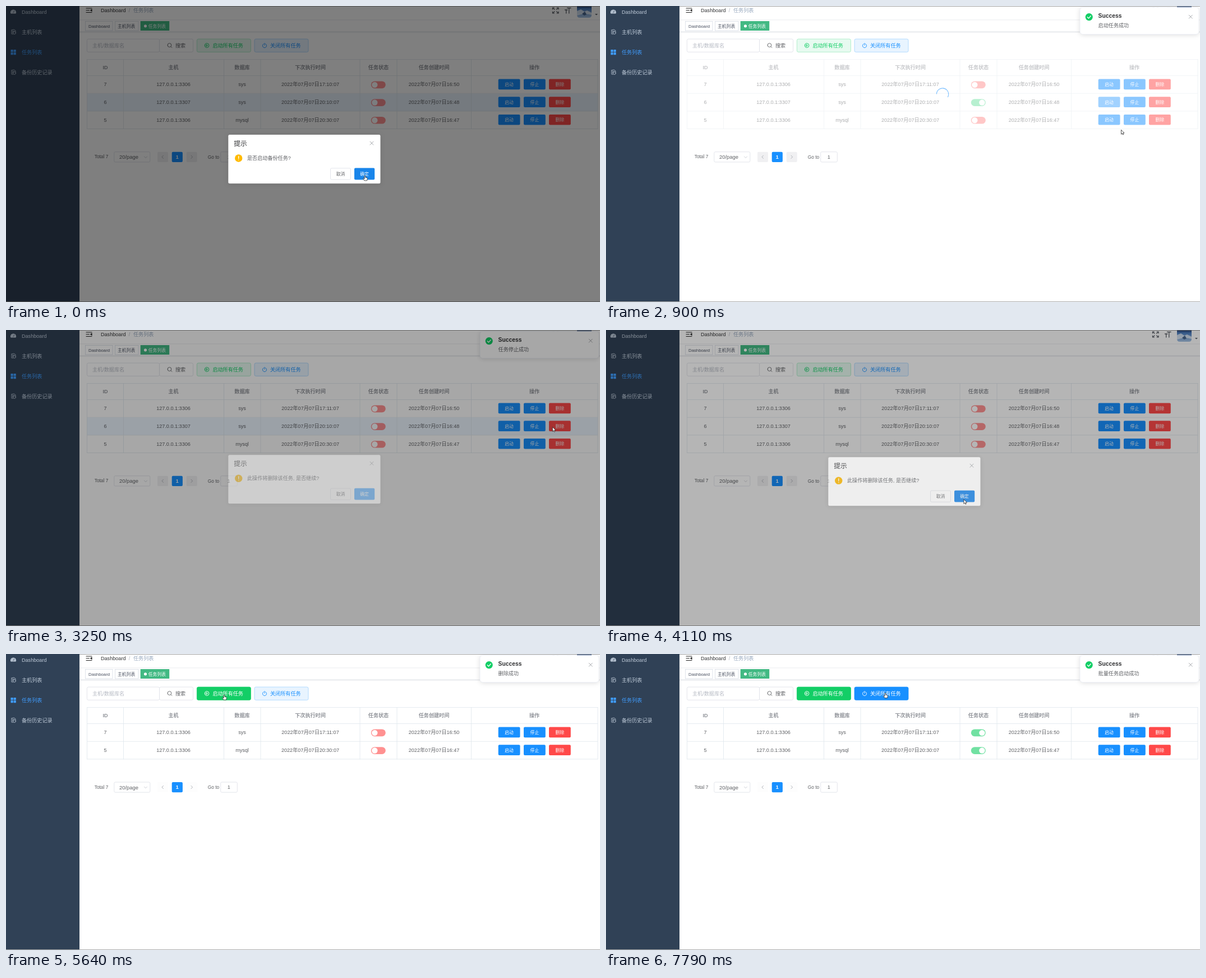
An HTML page for the animation above (8 s loop, 1059 by 529 pixels).

```html
<!DOCTYPE html>
<html lang="zh">
<head>
<meta charset="utf-8">
<title>任务列表</title>
<style>
html, body { margin: 0; width: 100%; height: 100%; overflow: hidden; background: #fff; }
svg { display: block; width: 100vw; height: 100vh; font-family: "Liberation Sans", "Noto Sans CJK SC", "Noto Sans CJK", sans-serif; }
text { white-space: pre; }
.mid { text-anchor: middle; }
.bold { font-weight: 700; }
.line { fill: none; stroke-linecap: round; stroke-linejoin: round; }
.card { filter: drop-shadow(0 1px 4px rgba(0, 0, 0, .13)); }
</style>
</head>
<body>
<svg id="stage" viewBox="0 0 1059 529" xmlns="http://www.w3.org/2000/svg"></svg>
<script>
const LOOP = 8000;
const BLUE = '#1890ff', BLUE_LIT = '#46a6ff', RED = '#ff4949', RED_LIT = '#ff6d6d';
const GREEN = '#13ce66', INK = '#606266', HEAD = '#909399', EDGE = '#dfe6ec', FIELD = '#dcdfe6';
const COLS = [144.5, 209.5, 388.5, 454, 631, 697, 829.5, 1055];
const MIDS = [177, 298.5, 421, 542.5, 664, 763, 942];
const ROW_H = 31.7, HEAD_Y = 95.5, BODY_Y = 124.5;

// Drawing helpers: text is placed by its vertical middle
const text = (x, y, s, size = 9.1, fill = INK, cls = '', id = '') =>
  `<text x="${x}" y="${y + size * .36}" font-size="${size}" fill="${fill}" class="${cls}" id="${id}">${s}</text>`;
const rect = (x, y, w, h, fill, r = 0, stroke = 'none', id = '') =>
  `<rect x="${x}" y="${y}" width="${w}" height="${h}" fill="${fill}" rx="${r}" stroke="${stroke}" stroke-width=".8" id="${id}"/>`;
const dot = (x, y, r, fill) => `<circle cx="${x}" cy="${y}" r="${r}" fill="${fill}"/>`;
const line = (d, color, w = .8) => `<path d="${d}" class="line" stroke="${color}" stroke-width="${w}"/>`;
const group = (id, body, cls = '') => `<g id="${id}" class="${cls}">${body}</g>`;
const cross = (x, y) => line(`M${x - 3} ${y - 3}l6 6m0-6l-6 6`, HEAD);

function listIcon(y) {
  return line(`M10 ${y - 3}l4-1 3 2v2M10 ${y - 3}v7h2.5M11.5 ${y - 1}h3M11.5 ${y + 1}h1.5`, '#bfcbd9', .8) +
    `<circle cx="15" cy="${y + 2}" r="2.4" class="line" stroke="#bfcbd9" stroke-width=".8"/>`;
}

function sidebar() {
  const grid = [[8.5, 78], [13.6, 78], [8.5, 83], [13.6, 83]]
    .map(([x, y]) => rect(x, y, 4.2, 4.2, '#409eff', .5)).join('');
  const gauge = `<path d="M8.5 13.6A5 5 0 1 1 17.5 13.6Z" fill="#bfcbd9"/>` +
    line('M13 12l1.6-4M10.3 10.8h.2M11 8h.2M15.6 10.8h.2', '#304156', .9);
  return rect(0, 0, 131, 529, '#304156') + gauge + grid + listIcon(46) + listIcon(118) +
    text(28, 10.5, 'Dashboard', 9.1, '#bfcbd9') + text(28, 46.5, '主机列表', 9.1, '#bfcbd9') +
    text(28, 82.5, '任务列表', 9.1, '#409eff') + text(28, 118.5, '备份历史记录', 9.1, '#bfcbd9');
}

function navbar() {
  const menu = line('M143 4h10M143 11.5h10M143 7.7h5.5M153 6l-2.2 1.7 2.2 1.7z', '#222', 1.1);
  const full = line('M974.5 6v-3h3m4.500 0h3v3m0 4v3h-3m-4.500 0h-3v-3M975 3.500l3 2.700M984.500 3.500l-3 2.700M975 12.500l3-2.700M984.500 12.500l-3-2.700', '#5a5e66', 1.2);
  const size = line('M1000.500 3.500h6.500M1003.800 3.500v9.500M996.500 7h4.500M998.700 7v6', '#5a5e66', 1.3);
  const avatar = `<path d="M1018 0h26v16q0 5-5 5h-16q-5 0-5-5z" fill="url(#sky)"/>` +
    `<path d="M1018 9l7-3 6 4 5-2 8 4v4q-12-4-26 1z" fill="#e9f0f8" opacity=".8"/>` +
    `<path d="M1027 14l5-4 3 5-4 2z" fill="#49678f"/>`;
  return menu + text(169, 8, 'Dashboard', 9.1, '#303133') + text(218.800, 8, '/', 9.1, '#b0b5bf') +
    text(227, 8, '任务列表', 9.1, '#97a8be') + full + size + avatar +
    `<path d="M1050 14h5l-2.500 2.600z" fill="#5a5e66"/>` +
    rect(131, 24.500, 928, .8, '#e6e8ec') + rect(131, 45.600, 928, 1, '#d4d8de') + rect(131, 46.600, 928, 1.400, '#f3f4f6') +
    rect(141.500, 27.500, 48.500, 16.500, '#fff', 0, '#d8dce5') + text(147, 35.800, 'Dashboard', 7.8, '#495060') +
    rect(194.500, 27.500, 41.500, 16.500, '#fff', 0, '#d8dce5') + text(199, 35.800, '主机列表', 7.8, '#495060') +
    rect(239.700, 27, 51.500, 17, '#42b983') + dot(248.500, 35.800, 2.600, '#fff') + text(253.800, 35.800, '任务列表', 7.8, '#fff');
}

function bigButton(id, x, label, icon) {
  return `<g id="${id}">` + rect(x, 59, 96, 23.300, 'none', 2.500, 'none') +
    `<path d="${icon}" class="line" stroke-width=".9"/>` + text(x + 28, 70.700, label) + '</g>';
}

function toolbar() {
  const play = 'M354.300 70.500a3.800 3.800 0 1 0 7.600 0a3.800 3.800 0 1 0-7.600 0M357.100 68.800l2.700 1.700-2.700 1.700z';
  const power = 'M459.300 67.700a3.600 3.600 0 1 0 3.400 0M461 66.500v3.600';
  return rect(144.400, 59, 129.200, 23.300, '#fff', 2.500, FIELD) + text(154, 71, '主机/数据库名', 9.1, '#b7bbc4') +
    rect(273.600, 59, 60, 23.300, '#fff', 2.500, FIELD) +
    line('M288 70a3.400 3.400 0 1 0 6.800 0a3.400 3.400 0 1 0-6.800 0M294 72.600l1.800 1.800', INK, .9) + text(302, 70.700, '搜索') +
    bigButton('startAll', 340.400, '启动所有任务', play) + bigButton('stopAll', 443, '关闭所有任务', power);
}

function row(i, id, host, db, next, made) {
  const y = 15.500;
  const cells = [id, host, db, next].map((s, c) => text(MIDS[c], y, s, 9.1, INK, 'mid', c === 3 ? 'next' + i : '')).join('');
  const sw = `<g opacity=".6">${rect(650.800, 10, 26, 12.700, RED, 6.350, 'none', 'track' + i)}` +
    `<circle id="knob${i}" cy="16.350" r="5.200" fill="#fff"/></g>`;
  const buttons = ['启动', '停止', '删除'].map((s, k) => {
    const x = [877.700, 923, 968][k];
    return rect(x, 6.100, 38.800, 18.600, BLUE, 2, 'none', `btn${i}${k}`) + text(x + 19.400, 15.600, s, 7.8, '#fff', 'mid');
  }).join('');
  return group('row' + i, rect(144.500, 0, 910.500, ROW_H, '#ecf5ff', 0, 'none', 'hover' + i) +
    cells + sw + text(MIDS[5], y, made, 9.1, INK, 'mid') + buttons + rect(144.500, ROW_H - .4, 910.500, .8, EDGE));
}

function table() {
  const names = ['ID', '主机', '数据库', '下次执行时间', '任务状态', '任务创建时间', '操作'];
  const day = '2022年07月07日';
  return names.map((s, c) => text(MIDS[c], 110, s, 9.1, HEAD, 'mid bold')).join('') +
    row(0, 7, '127.0.0.1:3306', 'sys', day + '17:10:07', day + '16:50') +
    row(1, 6, '127.0.0.1:3307', 'sys', day + '20:10:07', day + '16:48') +
    row(2, 5, '127.0.0.1:3306', 'mysql', day + '20:30:07', day + '16:47') +
    `<path id="lines" class="line" stroke="${EDGE}" stroke-width=".8"/>`;
}

function pager() {
  const box = (x, w, fill, stroke, id) => rect(x, 260.700, w, 18.200, fill, 2, stroke, id);
  return group('pager', text(157.800, 269.500, 'Total 7', 8.3) +
    box(192.800, 64, '#fff', FIELD) + text(202, 270, '20/page', 9.4) + line('M246.500 269l2.500 2.500 2.500-2.500', '#c0c4cc') +
    box(270, 19, '#f0f0f2', 'none', 'prev') + line('M280.500 267.200l-2.600 2.600 2.600 2.600', '#a8abb2', .9) +
    box(295.700, 19.200, BLUE) + text(305.300, 269.700, '1', 9, '#fff', 'mid bold') +
    box(321.700, 19, '#f0f0f2', 'none', 'following') + line('M330 267.200l2.600 2.600-2.600 2.600', '#a8abb2', .9) +
    text(359.800, 269.800, 'Go to', 8.3) + box(382.700, 29.600, '#fff', FIELD) + text(397.300, 269.800, '1', 9, INK, 'mid'));
}

function toast(i, message) {
  return group('toast' + i, rect(845, 2.300, 212, 48.200, '#fff', 5, '#ebeef5') + dot(861.200, 19.600, 6.600, GREEN) +
    line('M858.200 19.800l2.200 2.200 3.900-4.200', '#fff', 1.300) + text(877.600, 17.700, 'Success', 10.3, '#303133', 'bold') +
    text(877.600, 34.300, message) + cross(1042.300, 19.200), 'card');
}

function dialog(i, message) {
  return group('dialog' + i, rect(396.300, 230, 271.200, 87.200, '#fff', 2.500) + text(406.300, 245.300, '提示', 11.8, '#303133') +
    cross(652, 245.200) + dot(414.700, 272, 6.700, '#ffba00') +
    line('M414.700 268.500v4.200M414.700 275.200v.1', '#fff', 1.300) + text(430, 272, message) +
    rect(578.500, 289.900, 36, 20.300, '#fff', 2, FIELD) + text(596.500, 300.200, '取消', 7.8, INK, 'mid') +
    rect(621, 289.600, 36.200, 20.800, BLUE, 2, 'none', 'ok' + i) + text(639, 300.200, '确定', 7.8, '#fff', 'mid'), 'card');
}

// Timeline, in ms
const MASKS = [[390, 820], [1720, 2167], [6070, 6477]];
const TOASTS = [
  { msg: '启动任务成功', from: 400, to: 2400 },
  { msg: '任务停止成功', from: 1670, to: 3670, rise: 2400 },
  { msg: '删除成功', from: 4210, to: 6160 },
  { msg: '批量任务启动成功', from: 6080, to: 9000, rise: 6160 }
];
const DIALOGS = [
  { msg: '是否启动备份任务?', from: -1000, to: 70, press: -1 },
  { msg: '此操作将删除该任务, 是否继续?', from: 3170, to: 4060, press: 3990 }
];
const LIT = { btn10: [300, 1640], btn11: [1380, 3080], btn12: [2780, 3170], btn22: [4230, 5640] };
const HANDS = [[0, 110], [1380, 1680], [2800, 3170], [3800, 4080], [5320, 5850], [7350, LOOP]];
const REMOVED = 4230;
const PATH = [
  [0, 640, 303], [90, 640, 303], [360, 648, 286], [510, 660, 285], [630, 700, 282], [780, 840, 250], [900, 918, 221],
  [1050, 930, 206], [1410, 942, 170], [1640, 942, 170], [1810, 930, 196], [1960, 890, 204], [2230, 842, 215],
  [2450, 872, 206], [2710, 972, 181], [2860, 974, 173], [3280, 974, 173], [3850, 639, 298], [4060, 639, 298],
  [4230, 634, 312], [4380, 631, 324], [4600, 625, 312], [5100, 443, 102], [5220, 400, 90], [5340, 389, 73],
  [5780, 389, 73], [6030, 584, 242], [6180, 612, 262], [6500, 624, 272], [6880, 624, 272], [7400, 508, 84],
  [7670, 498, 71], [7790, 498, 69.500]
];

const stage = document.getElementById('stage');
stage.innerHTML = '<defs><linearGradient id="sky" x2="0" y2="1"><stop stop-color="#1f3768"/>' +
  '<stop offset=".25" stop-color="#4d7fc0"/><stop offset="1" stop-color="#a9c6e6"/></linearGradient></defs>' +
  rect(0, 0, 1059, 529, '#fff') + sidebar() + navbar() + toolbar() + table() + pager() +
  group('mask', rect(144, 95, 911.500, 125, '#fff', 0, 'none', 'veil') +
    `<circle id="spin" r="20" class="line" stroke="${BLUE}" stroke-width="2"/>`) +
  TOASTS.map((o, i) => toast(i, o.msg)).join('') +
  rect(131, 0, 928, .9, '#999') + rect(0, 528, 1059, 1, '#aaa') +
  rect(0, 0, 1059, 529, '#000', 0, 'none', 'shade') +
  DIALOGS.map((o, i) => dialog(i, o.msg)).join('') +
  '<g id="cursor" fill="#fff" stroke="#222" stroke-width=".75" stroke-linejoin="round">' +
  '<path id="arrow" d="M.4.400V8.300L2.200 6.600 3.400 9.200 4.700 8.600 3.500 6.100H6Z"/>' +
  '<path id="hand" d="M-.9.900Q-.9 0 0 0T.9.900V3.400L3.600 4Q4.500 4.300 4.300 5.400L3.600 9H-1.100L-3.200 5.700Q-3.400 4.600-2.400 4.800L-.9 6Z"/></g>';

const $ = id => document.getElementById(id);
const set = (id, attrs) => { for (const k in attrs) $(id).setAttribute(k, attrs[k]); };
const show = (id, on) => set(id, { display: on ? 'inline' : 'none' });
const within = (t, [a, b]) => t >= a && t < b;
const clamp = x => Math.max(0, Math.min(1, x));

function bezier(x1, y1, x2, y2) {
  const at = (a, b, u) => 3 * a * u * (1 - u) ** 2 + 3 * b * u * u * (1 - u) + u ** 3;
  return x => {
    x = clamp(x);
    if (x === 0 || x === 1) return x;
    let lo = 0, hi = 1;
    for (let i = 0; i < 20; i++) {
      const m = (lo + hi) / 2;
      if (at(x1, x2, m) < x) lo = m; else hi = m;
    }
    return at(y1, y2, lo);
  };
}
const ease = bezier(.25, .1, .25, 1), inOut = bezier(.42, 0, .58, 1);
const run = (t, from, ms = 300) => ease((t - from) / ms);

function pointer(t) {
  const i = PATH.findIndex(p => p[0] > t);
  if (i < 0) return PATH[PATH.length - 1].slice(1);
  const [a, x, y] = PATH[i - 1], [b, u, v] = PATH[i], k = (t - a) / (b - a);
  return [x + (u - x) * k, y + (v - y) * k];
}

function setSwitch(i, k) {
  const off = [255, 73, 73], on = [19, 206, 102];
  set('track' + i, { fill: `rgb(${off.map((c, n) => Math.round(c + (on[n] - c) * k))})` });
  set('knob' + i, { cx: 657.300 + 13.100 * k });
}

function setBig(id, on, color, pale, edge) {
  const [box, icon, label] = $(id).children, ink = on ? '#fff' : color;
  box.setAttribute('fill', on ? color : pale);
  box.setAttribute('stroke', on ? color : edge);
  icon.setAttribute('stroke', ink);
  label.setAttribute('fill', ink);
}

function draw(t) {
  const removed = t >= REMOVED, count = removed ? 2 : 3, end = BODY_Y + ROW_H * count;
  const [x, y] = pointer(t);
  const modal = DIALOGS.some(d => t >= d.from && t < d.to);
  const mask = MASKS.find(([a, b]) => within(t, [a, b + 300]));

  let over = modal ? 1 : -1;
  if (!modal && !mask && x > 144 && x < 1055 && y > BODY_Y && y < end) {
    over = Math.floor((y - BODY_Y) / ROW_H);
    if (removed && over === 1) over = 2;
  }
  for (let i = 0; i < 3; i++) {
    const slot = removed && i === 2 ? 1 : i;
    set('row' + i, { transform: `translate(0 ${BODY_Y + slot * ROW_H})` });
    show('hover' + i, over === i);
    setSwitch(i, i === 1 ? run(t, 480) - run(t, 1800) : run(t, 6200));
    for (let k = 0; k < 3; k++) {
      const id = `btn${i}${k}`, lit = LIT[id] && within(t, LIT[id]);
      set(id, { fill: k === 2 ? (lit ? RED_LIT : RED) : lit ? BLUE_LIT : BLUE });
    }
  }
  show('row1', !removed);
  $('next0').textContent = `2022年07月07日17:${t < 460 ? 10 : 11}:07`;
  set('lines', { d: COLS.map(c => `M${c} ${HEAD_Y}V${end}`).join('') + `M144.500 ${HEAD_Y}H1055M144.500 ${BODY_Y}H1055` });
  set('pager', { transform: `translate(0 ${removed ? -ROW_H : 0})` });
  for (const id of ['prev', 'following']) set(id, { fill: removed ? '#fdfdfd' : '#f0f0f2' });

  setBig('startAll', t >= 5340, GREEN, '#e7faf0', '#a1ebc2');
  setBig('stopAll', t >= 7430, BLUE, '#e8f4ff', '#a3d3ff');

  show('mask', mask);
  if (mask) {
    const s = (t - mask[0]) / 1000, p = inOut(s / .75);
    set('mask', { opacity: run(t, mask[0]) * (1 - run(t, mask[1])) });
    set('veil', { height: end - 94.500, opacity: .9 });
    set('spin', {
      transform: `translate(600 ${(HEAD_Y + end) / 2}) rotate(${180 * s}) scale(.535)`,
      'stroke-dasharray': `${1 + 89 * p} 200`, 'stroke-dashoffset': -40 * p
    });
  }

  TOASTS.forEach((o, i) => {
    show('toast' + i, within(t, [o.from, o.to + 300]));
    const dx = 222 * (1 - run(t, o.from)), dy = o.rise ? 59.400 * (1 - run(t, o.rise, 400)) : 0;
    set('toast' + i, { transform: `translate(${dx} ${dy})`, opacity: 1 - run(t, o.to) });
  });

  let shade = 0;
  DIALOGS.forEach((d, i) => {
    const k = run(t, d.from) * (1 - run(t, d.to));
    shade += .5 * run(t, d.from, 200) * (1 - run(t, d.to, 200));
    show('dialog' + i, k > 0);
    set('dialog' + i, { transform: `translate(0 ${-12.500 * (1 - k)})`, opacity: k });
    set('ok' + i, { fill: t >= d.press ? '#1985ea' : BLUE_LIT });
  });
  set('shade', { opacity: shade });

  const hand = HANDS.some(h => within(t, h));
  show('hand', hand);
  show('arrow', !hand);
  set('cursor', { transform: `translate(${x} ${y})` });
}

const start = performance.now();
function tick() {
  draw((performance.now() - start) % LOOP);
  requestAnimationFrame(tick);
}
tick();
</script>
</body>
</html>
```
